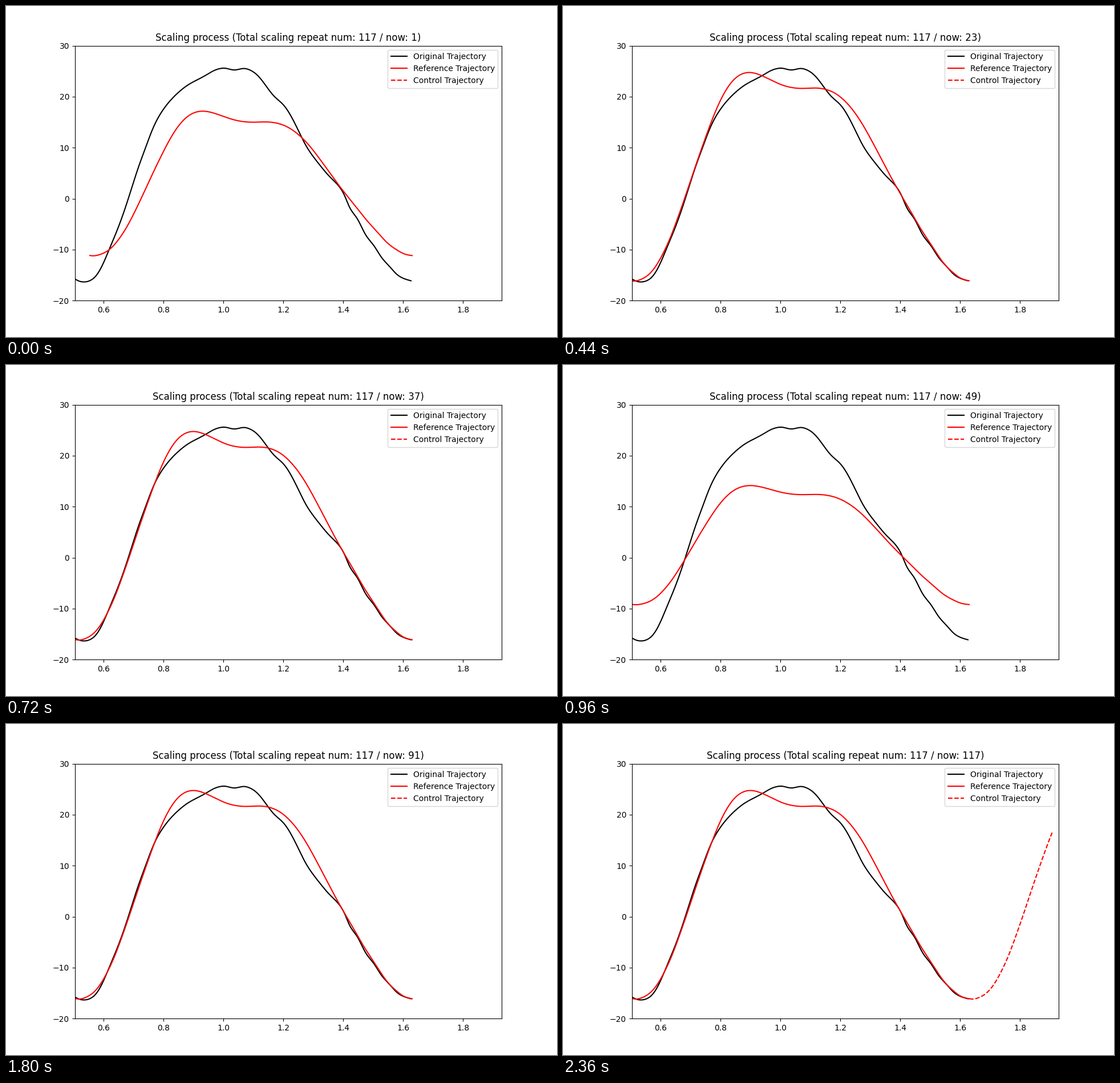
A matplotlib script that plays this animation: 966 by 580 pixels, repeating every 2960 ms.

```python
import numpy as np
import matplotlib.pyplot as plt
from matplotlib.animation import FuncAnimation

W, H, DPI = 966, 580, 100
XLIM, YLIM = (0.504, 1.93), (-20, 30)
FRAMES, INTERVAL = 74, 40
TOTAL = 117          # cost evaluations of the fit
DONE = 59            # frame at which the control curve appears
GOLD = 1.618034

# Curve knots in stage pixels
ORIGINAL = [
    (121, 478.5), (128, 482), (136, 483.5), (147, 481.3), (158, 472.5),
    (170, 452), (182, 424), (196, 390), (208, 357), (220, 320), (232, 283),
    (244, 250), (258, 213.5), (276, 181), (290, 163.5), (305, 149),
    (318, 139), (335, 129.5), (350, 121.5), (365, 113), (375, 109.7),
    (384, 109), (393, 111), (402, 112), (410, 110.5), (417, 109.5),
    (426, 111.5), (437, 118), (446, 127), (458, 143), (470, 158), (487, 174),
    (498, 190), (511, 215), (525, 243), (538, 263), (552, 281), (566, 297.5),
    (586, 319), (593, 331), (602, 352), (616, 373), (630, 400), (645, 420),
    (658, 440), (672, 456), (685, 470), (693, 475.5), (700, 478.5),
    (710, 481.5),
]
REFERENCE = [
    (147, 437.2), (153, 437.7), (163, 436), (175, 431), (187, 421.5),
    (200, 405.5), (213, 385), (225, 362), (238, 335), (250, 309),
    (262, 283.5), (276, 255), (290, 229), (303, 209.5), (316, 195.5),
    (330, 187), (346, 184.3), (362, 187), (380, 193), (400, 199.5),
    (418, 202.8), (432, 203.6), (458, 203.2), (475, 205.3), (492, 211.3),
    (506, 220), (520, 232), (535, 248.5), (550, 268), (566, 290), (582, 312),
    (602, 337.6), (616, 355), (632, 375), (650, 395), (668, 414.5),
    (685, 427.3), (700, 435), (712, 437.3),
]


def to_data(points):
    px, py = np.array(points, float).T
    x = XLIM[0] + (px / W - 0.125) / 0.775 * (XLIM[1] - XLIM[0])
    y = YLIM[1] - (py / H - 0.12) / 0.77 * (YLIM[1] - YLIM[0])
    return x, y


def spline(points, n=500):
    """Natural cubic spline through the points."""
    x, y = to_data(points)
    h = np.diff(x)
    m = len(x)
    a, rhs = np.eye(m), np.zeros(m)
    for i in range(1, m - 1):
        a[i, i - 1:i + 2] = h[i - 1], 2 * (h[i - 1] + h[i]), h[i]
        rhs[i] = 6 * ((y[i + 1] - y[i]) / h[i] - (y[i] - y[i - 1]) / h[i - 1])
    c = np.linalg.solve(a, rhs)
    t = np.linspace(x[0], x[-1], n)
    i = np.clip(np.searchsorted(x, t) - 1, 0, m - 2)
    u, v, d = x[i + 1] - t, t - x[i], h[i]
    out = (c[i] * u**3 + c[i + 1] * v**3) / (6 * d)
    out += (y[i] / d - c[i] * d / 6) * u + (y[i + 1] / d - c[i + 1] * d / 6) * v
    return t, out


def line_search(best, count, rate=0.0):
    """Steps of a Brent search: bracket, golden sections, then settling."""
    steps = [0, 1, -GOLD, 0, 1 - GOLD, 2 - GOLD]
    settle = [best * (1 - rate**(j + 1)) for j in range(count - len(steps))]
    return steps + settle


def powell():
    """Scale pairs (time, height) in the order they are evaluated."""
    point = np.array([1.0, 1.0])
    start = point.copy()
    path = [point.copy()]
    rounds = [((0.05, 14, 0.4), (0.442, 12)),
              ((-0.0055, 16), (0.0, 21)),
              ((0.0, 26), (0.0, 25))]
    for number, searches in enumerate(rounds):
        for axis, search in enumerate(searches):
            direction = np.eye(2)[axis]
            path += [point + s * direction for s in line_search(*search)]
            point = point + search[0] * direction
        if number < len(rounds) - 1:
            path.append(2 * point - start)
            start = point.copy()
    return path


scales = powell()
ref_x, ref_y = spline(REFERENCE)
now_x = ref_x[-1]

fig = plt.figure(figsize=(W / DPI, H / DPI), dpi=DPI)
ax = fig.add_axes([0.125, 0.11, 0.775, 0.77])
ax.set(xlim=XLIM, ylim=YLIM)
ax.plot(*spline(ORIGINAL), "k-", label="Original Trajectory")
reference, = ax.plot([], [], "r-", label="Reference Trajectory")
control, = ax.plot([], [], "r--", label="Control Trajectory")
ax.legend(loc="upper right")
title = ax.set_title("")


def update(frame):
    now = min(1 + 2 * frame, TOTAL)
    sx, sy = scales[now - 1]
    reference.set_data(now_x - sx * (now_x - ref_x), sy * ref_y)
    if frame >= DONE:
        x = now_x + sx * (ref_x - ref_x[0])
        ahead = x <= 1.908
        control.set_data(x[ahead], sy * ref_y[ahead])
    else:
        control.set_data([], [])
    title.set_text(
        f"Scaling process (Total scaling repeat num: {TOTAL} / now: {now})")
    return reference, control, title


anim = FuncAnimation(fig, update, frames=FRAMES, interval=INTERVAL,
                     init_func=lambda: update(0), repeat=True, repeat_delay=0)
plt.show()
```
